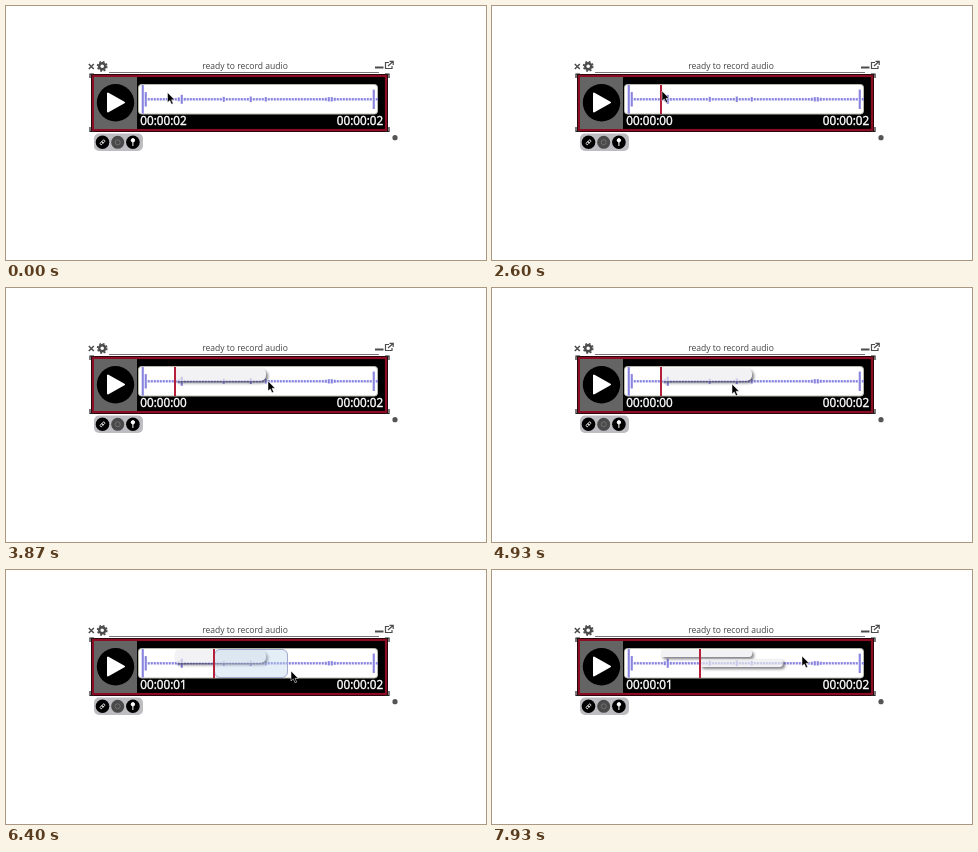
Recreate the animation shown at these times as an HTML page. Size 480 px wide and 254 px high, loop 8000 ms.

```html
<!DOCTYPE html>
<html lang="en">
<head>
<meta charset="utf-8">
<title>Audio recorder</title>
<style>
html, body { margin: 0; width: 100%; height: 100%; overflow: hidden; background: #fff; }
svg, .box { position: absolute; box-sizing: border-box; }
svg { left: 0; top: 0; }
text { font-family: "Open Sans", sans-serif; }
.note { border-radius: 3px 6px 6px 3px; background: rgba(236,236,238,.66); box-shadow: 2px 2px 3px rgba(45,45,55,.62); }
#region { top: 79px; height: 29px; border: 1px solid #a0a9cd; border-radius: 6px; background: rgba(190,214,235,.42); }
#head { top: 79px; width: 2px; height: 29px; background: #b51f3a; }
</style>
</head>
<body>
<svg width="480" height="254" viewBox="0 0 480 254">
  <!-- header -->
  <g fill="none" stroke="#4c4c4c" stroke-width="1.5">
    <path d="M82.8 58l5 5m0-5l-5 5"/>
    <circle cx="96.2" cy="60.3" r="3" stroke-width="2.4"/>
    <circle cx="96.2" cy="60.3" r="4.6" stroke-width="1.6" stroke-dasharray="1.9 1.71"/>
    <path d="M369 61.5h8.500" stroke-width="2"/>
    <path d="M383 56.500h-3.500v6h6.500v-2.500M382 60l5-4.500m-3.500-.2h3.700v3.700" stroke-width="1.200"/>
    <path d="M103 66.500h270" stroke="#777" stroke-width="1"/>
  </g>
  <text x="239" y="63.300" font-size="8.550" fill="#444" text-anchor="middle">ready to record audio</text>

  <!-- player -->
  <rect x="85" y="68" width="297" height="58" fill="#22060c"/>
  <rect x="87" y="70" width="293" height="54" stroke="#8a0d24" stroke-width="2.200"/>
  <path d="M84 72v-4h4M379 68h4v4M84 121v4.500h4M379 125.500h4v-4.500" fill="none" stroke="#222" stroke-width="1.200"/>
  <rect x="88" y="71" width="43" height="52" fill="#646464"/>
  <circle cx="109.500" cy="96.700" r="18.700"/>
  <path d="M102 87.500v18l16-9z" fill="#fff" stroke="#fff" stroke-width="2" stroke-linejoin="round"/>
  <rect x="132.500" y="78.500" width="239" height="29.500" rx="3" fill="#fff" stroke="#b9b9ae"/>
  <g id="wave" fill="#8783df"></g>
  <g font-size="11.700" fill="#fff" stroke="#fff" stroke-width=".4">
    <text id="time" x="134.300" y="119">00:00:02</text>
    <text x="377.200" y="119" text-anchor="end">00:00:02</text>
  </g>
  <circle cx="389" cy="131.700" r="2.600" fill="#555"/>

  <!-- toolbar -->
  <rect x="88" y="127.500" width="49" height="17.500" rx="5" fill="#bdbcc0"/>
  <circle cx="96.500" cy="136.300" r="6.800"/>
  <circle cx="111.700" cy="136.300" r="6.500" fill="#4a4a4a"/>
  <circle cx="126.900" cy="136.300" r="6.800"/>
  <g fill="none" stroke="#fff">
    <g transform="translate(96.500 136.300) rotate(-45) scale(.78)">
      <rect x="-3.700" y="-1.400" width="4.200" height="2.800" rx="1.400"/>
      <rect x="-.5" y="-1.400" width="4.200" height="2.800" rx="1.400"/>
    </g>
    <circle cx="111.700" cy="136.300" r="2.500" stroke="#707070"/>
    <path d="M126.900 134v6"/>
    <circle cx="126.900" cy="134.300" r="1.700" fill="#fff"/>
  </g>
</svg>

<div class="box note" id="noteA"></div>
<div class="box note" id="noteB"></div>
<div class="box" id="region"></div>
<div class="box" id="head"></div>
<svg width="480" height="254" viewBox="0 0 480 254">
  <path id="cursor" d="M0 0v10l2.300-2.100 1.700 3.900 1.700-.7-1.700-3.800h3.100z" stroke="#fff" stroke-width=".5"/>
</svg>

<script>
const $ = id => document.getElementById(id);
const LOOP = 8000, STEP = 1000 / 15;
const SEEK_A = 1725, SELECT_A = 2660, NOTE_A = 3660;
const SEEK_B = 5725, SELECT_B = 5925, NOTE_B = 7125;

// waveform: a bar every 3px, louder around each peak [x, height, spread]
const peaks = [[136, 26, 1], [139, 12, 1], [174.5, 7, 2], [217, 2.5, 1],
  [243.5, 3.5, 1.5], [259, 2, 1], [323.5, 2.2, 4], [367, 17, 1]];
for (let x = 136; x < 372; x += 3) {
  const h = peaks.reduce((sum, [c, top, w]) => sum + top * Math.exp(-(((x - c) / w) ** 2)), 2.4);
  $('wave').innerHTML += `<rect x="${x - 0.3}" y="${93.3 - h / 2}" width="2.1" height="${h}"/>`;
}

// pointer moves [from ms, to ms, x, y]
const moves = [[2250, 2400, 134, 127], [2400, 2600, 170, 85], [2600, 3000, 250, 90],
  [3000, 3133, 246, 90], [3133, 3533, 262, 93], [4500, 4933, 240, 96],
  [4933, 5733, 209, 91], [5900, 6400, 285, 101], [6400, 6667, 294, 100],
  [7467, 7933, 310, 86]];
const progress = (t, from, to) => Math.min(1, Math.max(0, (t - from) / (to - from)));
const smooth = k => k * k * (3 - 2 * k);

function pointer(t) {
  // one slowing loop around the waveform, then the moves
  const k = progress(t, 200, 1200);
  const turn = 2 * Math.PI * (1 - (1 - k) ** 2.8);
  const first = [161.5 + 8 * k - 30 * Math.sin(turn), 100.5 - 14 * Math.cos(turn)];
  return moves.reduce(([x, y], [from, to, x1, y1]) => {
    const e = smooth(progress(t, from, to));
    return [x + (x1 - x) * e, y + (y1 - y) * e];
  }, first);
}

function place(id, shown, box) {
  const s = $(id).style;
  s.display = shown ? 'block' : 'none';
  for (const side in box) s[side] = box[side] + 'px';
}

function draw(ms) {
  const t = Math.floor((ms % LOOP + 4) / STEP) * STEP % LOOP;
  const [x, y] = pointer(t);
  $('cursor').setAttribute('transform', `translate(${x} ${y})`);

  const second = t > SEEK_B, start = second ? 207 : 168;
  $('time').textContent = '00:00:0' + (t < SEEK_A ? 2 : second ? 1 : 0);
  place('head', t > SEEK_A, { left: start });

  const selecting = t > SELECT_A && t < NOTE_A || t > SELECT_B && t < NOTE_B;
  place('region', selecting, { left: start + 1, width: Math.max(2, x - 4 - start) });

  // overlapping notes share the track height
  const split = t > NOTE_B;
  place('noteA', t > NOTE_A, { left: 169, top: 80, width: 91, height: split ? 7 : 13 });
  place('noteB', split, { left: 208, top: 89, width: 83, height: 8 });
}

function frame(now) {
  draw(now);
  requestAnimationFrame(frame);
}
draw(0);
requestAnimationFrame(frame);
</script>
</body>
</html>
```
